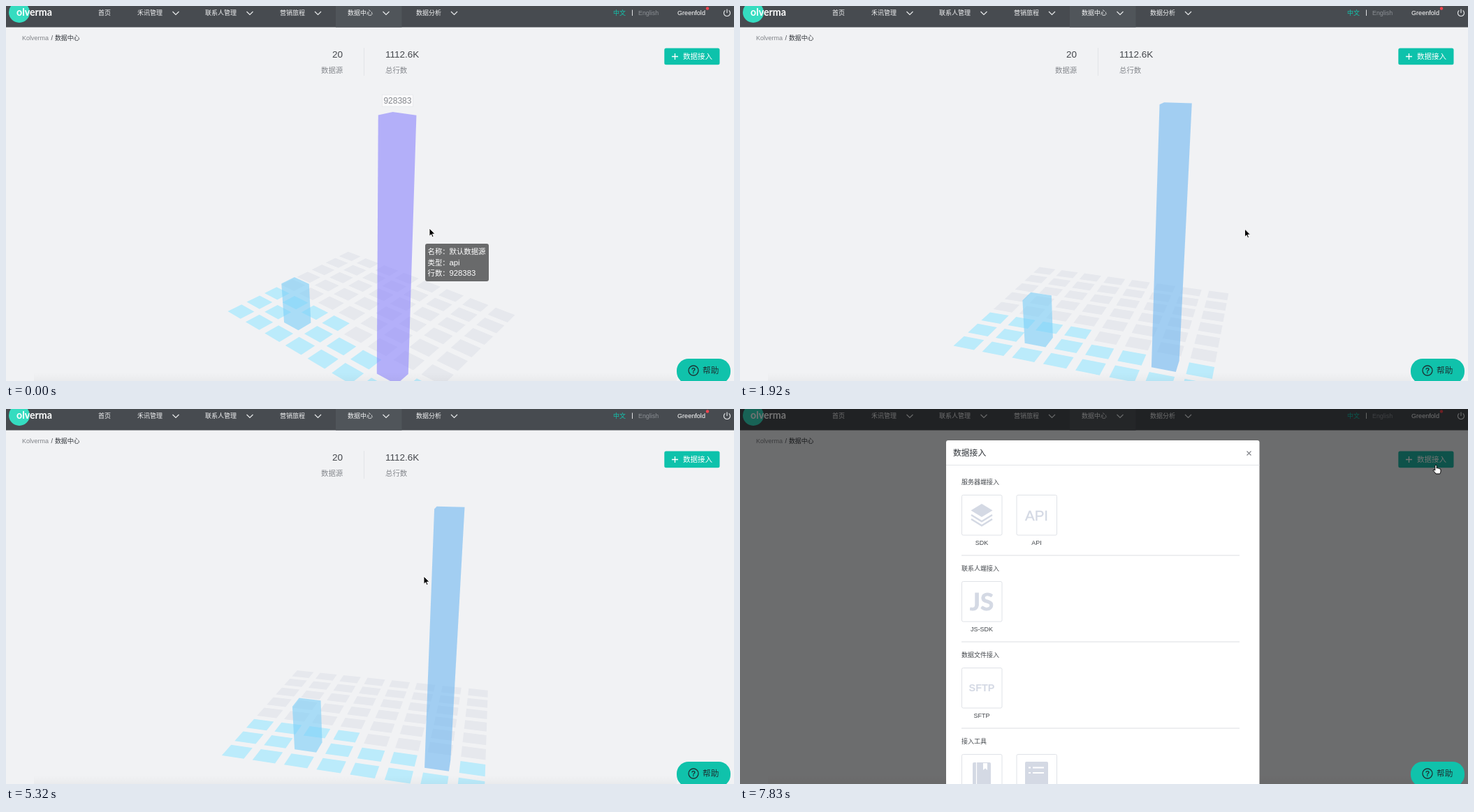
An HTML page for the animation above (8 s loop, 1042 px wide and 538 px high).

```html
<!DOCTYPE html>
<html lang="zh">
<head>
<meta charset="utf-8">
<title>数据中心</title>
<style>
html, body { margin: 0; width: 100%; height: 100%; overflow: hidden; background: #f1f2f4; }
svg { display: block; }
text { font-family: "Liberation Sans", "Noto Sans CJK SC", "Noto Sans CJK", sans-serif; white-space: pre; }
text.round { font-family: Lato, "Open Sans", sans-serif; font-weight: 700; }
</style>
</head>
<body>
<svg id="stage" width="1042" height="538" viewBox="0 0 1042 538">
  <defs>
    <linearGradient id="floor" x1="0" y1="0" x2="0" y2="1">
      <stop offset="0" stop-color="#000" stop-opacity="0"/>
      <stop offset="1" stop-color="#000" stop-opacity=".03"/>
    </linearGradient>
    <clipPath id="menuClip"><rect id="menuWindow" x="471" y="30" width="96" height="262"/></clipPath>
  </defs>
  <rect width="1042" height="538" fill="#f1f2f4"/>
  <g id="page"></g>
  <g id="chart"></g>
  <rect x="40" y="526" width="920" height="12" fill="url(#floor)"/>
  <g id="nav"></g>
  <g id="menu" clip-path="url(#menuClip)"></g>
  <g id="tip"></g>
  <rect id="shade" width="1042" height="538" fill="#000"/>
  <g id="modal"></g>
  <g id="help"></g>
  <g id="cursor"></g>
</svg>
<script>
const LOOP = 8000, STEP = 147.7;
const $ = id => document.getElementById(id);

function add(parent, tag, attrs, content) {
  const el = document.createElementNS('http://www.w3.org/2000/svg', tag);
  set(el, attrs);
  if (content) el.textContent = content;
  parent.append(el);
  return el;
}
function set(el, attrs) { for (const k in attrs) el.setAttribute(k, attrs[k]); }
const label = (g, x, y, str, size, fill, extra) =>
  add(g, 'text', { x, y, 'font-size': size, fill, ...extra }, str);
const box = (g, x, y, width, height, fill, extra) =>
  add(g, 'rect', { x, y, width, height, fill, ...extra });
const line = (g, d, stroke, width = 1) =>
  add(g, 'path', { d, stroke, 'stroke-width': width, fill: 'none' });
const show = (el, on) => el.setAttribute('visibility', on ? 'visible' : 'hidden');
const MID = { 'text-anchor': 'middle' }, BOLD = { 'font-weight': 700 }, MEDIUM = { 'font-weight': 500 };

// ---- page ----
const page = $('page');
label(page, 23, 48.5, 'Kolverma', 9, '#808388');
label(page, 64.5, 48.5, '/', 9, '#44484d');
label(page, 70, 48.5, '数据中心', 8.9, '#33373c', MEDIUM);
label(page, 482, 73.5, '20', 13.5, '#44474c', { 'text-anchor': 'end' });
label(page, 451, 95.5, '数据源', 10.4, '#85888d');
label(page, 543, 73.5, '1112.6K', 13.5, '#44474c');
label(page, 543, 95.5, '总行数', 10.4, '#85888d');
line(page, 'M512.5 60V100', '#e2e4e7');
const button = box(page, 942.3, 60.4, 79.2, 23.8, '#0dc2ab', { rx: 2.5 });
line(page, 'M953 72.5H962M957.5 68V77', '#fff', 1.3);
label(page, 969, 76.2, '数据接入', 10.5, '#fff', MEDIUM);

// ---- navigation ----
const nav = $('nav');
box(nav, 0, 0, 1042, 30.5, '#474b50');
box(nav, 472, 0, 94.5, 30.5, '#50555a');
add(nav, 'circle', { cx: 19, cy: 9, r: 15, fill: '#35dcc0' });
label(nav, 15, 13.5, 'olverma', 14.2, '#fff', { class: 'round' });
label(nav, 132, 12.8, '首页', 9, '#f2f3f4');
[[188, '禾讯管理', 243], [285, '联系人管理', 349], [392, '营销旅程', 446.5], [489, '数据中心', 544], [587, '数据分析', 641.5]]
  .forEach(([x, str, cx]) => {
    label(nav, x, 12.8, str, 9, '#f2f3f4');
    line(nav, `M${cx - 4.5} 8L${cx} 12.5L${cx + 4.5} 8`, '#e8eaeb', 1.2);
  });
label(nav, 869, 12.8, '中文', 9, '#12c4ad');
line(nav, 'M896.5 5.5V14', '#e0e2e4');
label(nav, 905, 12.8, 'English', 8.9, '#8b8f94');
label(nav, 961, 12.8, 'Greenfold', 9.1, '#fff');
add(nav, 'circle', { cx: 1004, cy: 3.5, r: 2.2, fill: '#f5444f' });
line(nav, 'M1029.3 6.4A4.5 4.5 0 1 0 1034.7 6.4M1032 4.5V10', '#eceef0', 1.1);

// ---- drop-down ----
const menu = $('menu');
box(menu, 472, 30, 94.5, 262, '#50555b');
[[31, 24, '数据管理'], [146.5, 23.5, '数据报告']].forEach(([y, h, str]) => {
  box(menu, 472, y, 94.5, h, '#43484d');
  label(menu, 483.5, y + 15, str, 9, '#12c4ad');
});
box(menu, 472, 55, 94.5, 30.5, '#5d6268');
[[70, '数据中心'], [100.5, '元数据'], [131, '标签管理'], [185, '联系人相关'], [215.5, '订单报告'], [246, '禾讯报告'], [276.5, '线上营销活动']]
  .forEach(([y, str], k) => {
    label(menu, 489.5, y + 3.3, str, 9, k ? '#eceeef' : '#fff', k ? {} : MEDIUM);
    if (k !== 2 && k !== 6) line(menu, `M472 ${y + 15.5}H566.5`, '#666b70', 0.8);
  });

// ---- tooltip ----
const tip = $('tip');
box(tip, 0, 0, 91, 54, '#000', { rx: 3, opacity: 0.56 });
['名称：', '类型：', '行数：'].forEach((str, k) => label(tip, 3.5, 15 + k * 15.7, str, 10.4, '#fff'));
label(tip, 34.5, 15, '默认数据源', 10.4, '#fff');
const tipType = label(tip, 34.5, 30.7, 'api', 11.3, '#fff');
const tipRows = label(tip, 34.5, 46.4, '0', 11.3, '#fff');

// ---- dialog ----
const modal = $('modal');
box(modal, 295, 45, 448.5, 520, '#fff', { rx: 3 });
label(modal, 305, 67, '数据接入', 11.8, '#2f3338', MEDIUM);
line(modal, 'M725.5 60.5L731.5 66.5M731.5 60.5L725.5 66.5', '#808388', 1.1);
line(modal, 'M295 80.5H743.5', '#e3e5e8');
const PALE = '#d4d9e4';
['服务器端接入', '联系人端接入', '数据文件接入', '接入工具'].forEach((str, k) => {
  const y = 124 * k;
  label(modal, 317, 108.3 + y, str, 9, '#44484d');
  for (const x of k % 3 ? [317.5] : [317.5, 396])
    box(modal, x, 123.5 + y, 57.5, 57.5, '#fff', { stroke: '#dfe2e7', rx: 2 });
  line(modal, `M317 ${210 + y}H715`, '#dcdee2');
});
add(modal, 'path', { d: 'M346 136L361.5 145.5L346 155L330.5 145.5Z', fill: PALE });
line(modal, 'M331 152L346 161.3L361 152M331 158L346 167.3L361 158', PALE, 2.4);
label(modal, 424.5, 159.7, 'API', 20.5, PALE, { ...MID, stroke: PALE, 'stroke-width': 0.4 });
label(modal, 346, 289, 'JS', 35, PALE, { ...MID, class: 'round', stroke: PALE, 'stroke-width': 0.8 });
label(modal, 346, 405, 'SFTP', 14.4, PALE, { ...MID, ...BOLD });
[[346, 195, 'SDK'], [424.5, 195, 'API'], [346, 319, 'JS-SDK'], [346, 443, 'SFTP']]
  .forEach(([x, y, str]) => label(modal, x, y, str, 9, '#44484d', MID));
box(modal, 333, 507, 26, 36, PALE, { rx: 2 });
line(modal, 'M338.5 507V540', '#fff', 1.2);
add(modal, 'path', { d: 'M348 508H354V518L351 515.5L348 518Z', fill: '#fff' });
box(modal, 408, 506, 33, 36, PALE, { rx: 2 });
line(modal, 'M413 514.5H416M419 514.5H435M413 522H416M419 522H435', '#fff', 2);

// ---- help ----
const help = $('help');
box(help, 960, 506, 77, 36, '#10c2ab', { rx: 17 });
add(help, 'circle', { cx: 984, cy: 523, r: 7, fill: 'none', stroke: '#1d3335', 'stroke-width': 1.3 });
label(help, 984, 526.8, '?', 10.5, '#1d3335', { ...MID, ...BOLD });
label(help, 997, 527.2, '帮助', 11.7, '#1d3335', MEDIUM);

// ---- cursor ----
const cursor = $('cursor');
const arrow = add(cursor, 'path', {
  d: 'M0 0V11.2L2.6 8.8L4.2 12.6L6 11.8L4.4 8.1H8Z',
  fill: '#000', stroke: '#fff', 'stroke-width': 0.9
});
const hand = add(cursor, 'path', {
  d: 'M-1.2 7V1.2Q0 -.8 1.2 1.2V5Q2.4 4 3.4 5.2Q4.6 4.6 5.2 5.8Q6.8 5.4 7 7V9.5Q6.8 11.5 5.8 13H0Q-1.6 10.5 -4 8.2Q-3.6 6 -1.2 8Z',
  fill: '#fff', stroke: '#000', 'stroke-width': 1, 'stroke-linejoin': 'round'
});

// ---- chart: 8 x 8 tiles seen by an orbiting camera ----
const CX = 521.7, CY = 280, FOCAL = 720, DIST = 15.9, GROUND = -4.115, DEPTH = 0.8;
const chart = $('chart');
const tiles = [], bars = [
  { i: 2, j: 6, h: 1.47, rows: '184137', type: 'sftp', fill: '#7bcff9' },
  { i: 6, j: 6, h: 7.42, rows: '928383', type: 'api', fill: '#6fb8f2' }
];
for (let j = 0; j < 8; j++)
  for (let i = 0; i < 8; i++) {
    if (bars.some(b => b.i === i && b.j === j)) continue;
    const used = j > 5 || (j === 5 && i < 4);
    tiles.push({ i, j, el: add(chart, 'polygon', { fill: used ? '#bbebfb' : '#e6e8ed' }) });
  }
for (const b of bars) b.el = add(chart, 'polygon', { 'fill-opacity': 0.6 });
const tag = add(chart, 'g', {});
box(tag, -22, -8.5, 44, 17, '#fafafb', { stroke: '#e4e6e9', 'stroke-width': 0.7 });
const tagText = label(tag, 0, 4.2, '', 12, '#86898e', MID);

function camera(azimuth, tilt) {
  const rad = Math.PI / 180;
  const ca = Math.cos(azimuth * rad), sa = Math.sin(azimuth * rad);
  const ct = Math.cos(tilt * rad), st = Math.sin(tilt * rad);
  return (i, j, h) => {
    const u = i - 3.5, v = (j - 3.5) * DEPTH, y = GROUND + h;
    const x = u * ca - v * sa, z = u * sa + v * ca;
    const k = FOCAL / (DIST - z * ct - y * st);
    return [CX + x * k, CY - (y * ct - z * st) * k];
  };
}
const corners = (see, { i, j }, r, h) =>
  [[-r, -r], [r, -r], [r, r], [-r, r]].map(([a, b]) => see(i + a, j + b, h));
const points = list => list.map(p => p.map(v => v.toFixed(2))).join(' ');

function hull(list) {
  const half = pts => {
    const out = [];
    for (const p of pts) {
      while (out.length > 1) {
        const [a, b] = out.slice(-2);
        if ((b[0] - a[0]) * (p[1] - a[1]) - (b[1] - a[1]) * (p[0] - a[0]) > 0) break;
        out.pop();
      }
      out.push(p);
    }
    return out.slice(0, -1);
  };
  const sorted = [...list].sort((a, b) => a[0] - b[0] || a[1] - b[1]);
  return [...half(sorted), ...half(sorted.reverse())];
}

// ---- motion: rows are [tick, values...] ----
const ORBIT = [[0, 40, 20.1], [3, 39.3, 19.2], [6, 37.3, 17.2], [8, 35.3, 16], [9, 34.1, 15.5],
  [11, 26, 15.8], [13, 18, 16.6], [15, 14, 17.3], [16, 13.4, 17.5]];
const POINTER = [[0, 606, 319], [4, 625, 315], [8, 679, 294], [9, 765, 270], [11, 805, 263], [12, 805, 268],
  [14, 640, 372], [16, 452, 462], [17, 428, 470], [18, 424, 471], [21, 432, 465], [22, 446, 456], [23, 500, 444],
  [24, 571, 422], [25, 606, 396], [27, 613, 386], [31, 623, 396], [35, 623, 396], [36, 598, 240], [37, 545, 80],
  [38, 518, 10], [39, 516, 14], [40, 520, 48], [41, 555, 72], [42, 647, 75], [43, 968, 92], [44, 988, 102],
  [45, 998, 88], [46, 996, 80]];
const TIP = [[0, 600, 341], [17, 440, 486], [18, 437, 488], [22, 455, 474], [25, 610, 415], [27, 615, 409], [31, 628, 415]];
const MENU = [[37, 0], [39, 200], [40, 262], [42, 262], [43, 93], [44, 0]];
const FADE = [[51, 0], [52, 0.5], [53, 1]];

function at(track, n) {
  const k = track.findIndex(row => row[0] > n);
  if (k < 0) return track[track.length - 1].slice(1);
  if (k === 0) return track[0].slice(1);
  const a = track[k - 1], b = track[k], f = (n - a[0]) / (b[0] - a[0]);
  return a.slice(1).map((v, m) => v + (b[m + 1] - v) * f);
}
const within = (n, a, b) => n >= a && n <= b;

function draw(n) {
  const see = camera(...at(ORBIT, n));
  const hover = n === 0 || within(n, 25, 35) ? bars[1] : within(n, 17, 22) ? bars[0] : null;

  for (const t of tiles) set(t.el, { points: points(corners(see, t, 0.36, 0)) });
  for (const b of bars) {
    const outline = hull([...corners(see, b, 0.35, 0), ...corners(see, b, 0.35, b.h)]);
    set(b.el, { points: points(outline), fill: b === hover ? '#8a84fe' : b.fill });
  }

  show(tag, hover);
  show(tip, hover);
  if (hover) {
    const [x, y] = see(hover.i, hover.j, hover.h + 0.34);
    set(tag, { transform: `translate(${x.toFixed(1)} ${y.toFixed(1)})` });
    set(tip, { transform: `translate(${at(TIP, n)})` });
    tagText.textContent = tipRows.textContent = hover.rows;
    tipType.textContent = hover.type;
  }

  set($('menuWindow'), { height: at(MENU, n)[0] });
  set(button, { fill: n >= 45 ? '#20b7a4' : '#0dc2ab' });

  const [fade] = at(FADE, n);
  set($('shade'), { opacity: 0.55 * fade });
  set(modal, { opacity: fade, transform: `translate(0 ${-20 * (1 - fade)})` });
  show(modal, fade > 0);

  const pointing = within(n, 17, 22) || within(n, 25, 35) || within(n, 38, 41) || n >= 48;
  show(hand, pointing);
  show(arrow, !pointing);
  set(cursor, { transform: `translate(${at(POINTER, n)})` });
}

const start = performance.now();
let last = -1;
function tick() {
  const t = (performance.now() - start) % LOOP;
  const n = Math.min(53, Math.floor(t / STEP + 0.08));
  if (n !== last) draw(last = n);
  requestAnimationFrame(tick);
}
tick();
</script>
</body>
</html>
```
